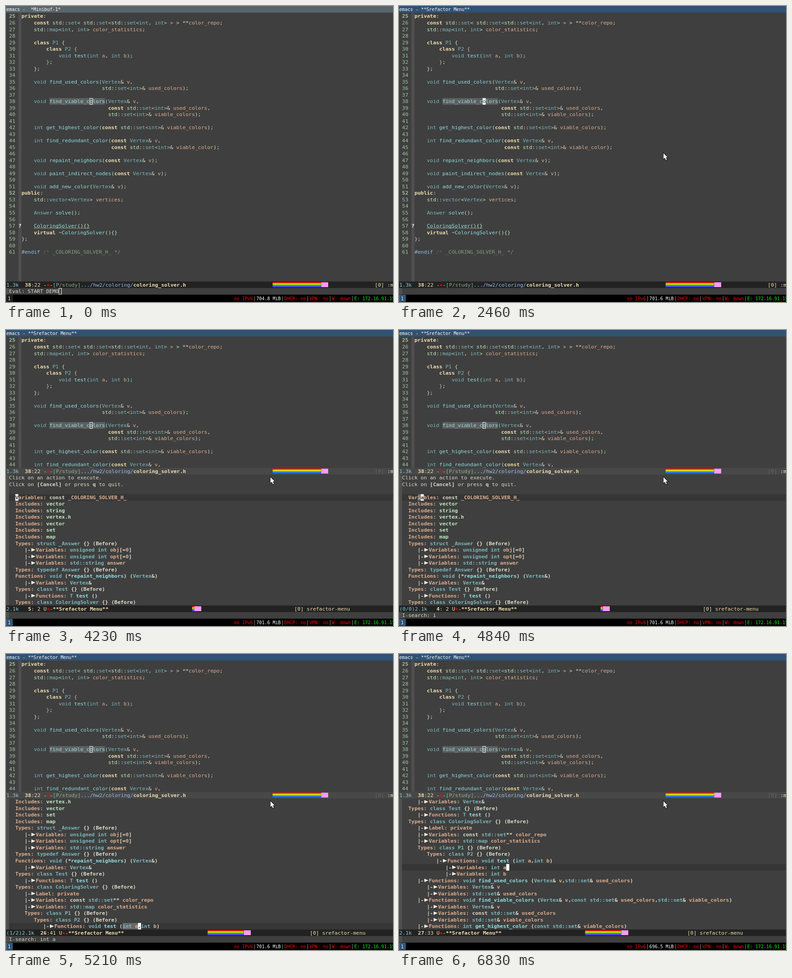
An HTML page with a canvas that plays this animation: 854 by 656 pixels, repeating every 8000 ms.

```html
<!DOCTYPE html>
<html lang="en">
<head>
<meta charset="utf-8">
<title>Refactor menu demo</title>
<style>
html, body { margin: 0; width: 100%; height: 100%; overflow: hidden; background: #3f3f3f; }
canvas { display: block; }
</style>
</head>
<body>
<canvas id="stage" width="854" height="656"></canvas>
<script>
const ctx = document.getElementById('stage').getContext('2d');

// The desktop is laid out on 1000 x 768 and shown at this scale.
const SCALE = 0.854, CHAR = 8, ROW = 17, TOP = 18, BOTTOM = 715, LOOP = 8000;
const ARROW_EXTRA = 5; // the arrow glyph is wider than a cell

const FG = '#dcdccc', BG = '#3f3f3f', CREAM = '#f0dfaf', TYPE = '#7cb8bb', FUNC = '#93e0e3',
  VAR = '#dfaf8f', MINT = '#bfebbf', BLUE = '#94bff3', SKY = '#8cd0d3', RED = '#ff0000',
  FRINGE = '#4f4f4f', CURSOR = '#ffffff';
const NESTING = [FG, FG, MINT, '#d0bf8f', FUNC];
const BANDS = ['#ff0000', '#ff9900', '#ffff00', '#33ee00', '#0099ff', '#6633ff'];

const codeText = `private:
    const std::set< std::set<std::set<int, int> > > **color_repo;
    std::map<int, int> color_statistics;

    class P1 {
        class P2 {
            void test(int a, int b);
        };
    };

    void find_used_colors(Vertex& v,
                          std::set<int>& used_colors);

    void find_viable_colors(Vertex& v,
                            const std::set<int>& used_colors,
                            std::set<int>& viable_colors);

    int get_highest_color(const std::set<int>& viable_colors);

    int find_redundant_color(const Vertex& v,
                             const std::set<int>& viable_color);

    void repaint_neighbors(const Vertex& v);

    void paint_indirect_nodes(const Vertex& v);

    void add_new_color(Vertex& v);
public:
    std::vector<Vertex> vertices;

    Answer solve();

    ColoringSolver(){}
    virtual ~ColoringSolver(){}
};

#endif /* _COLORING_SOLVER_H_ */`;

const smallText = `Functions: void find_viable_colors (Vertex& v,const std::set& used_colors,std::set& viable_colors)
Press 1-9 or click on an action to execute.
Click on [Cancel] or press q to quit.

  [1] Move (Current file)
  [2] Generate Function Pointer (Current file)
  [3] Generate Function Implementation (Other file)

[Cancel]`;

const bigText = `Click on an action to execute.
Click on [Cancel] or press q to quit.

  Variables: const _COLORING_SOLVER_H_
  Includes: vector
  Includes: string
  Includes: vertex.h
  Includes: vector
  Includes: set
  Includes: map
  Types: struct _Answer {} (Before)
     |-►Variables: unsigned int obj[=0]
     |-►Variables: unsigned int opt[=0]
     |-►Variables: std::string answer
  Types: typedef Answer {} (Before)
  Functions: void (*repaint_neighbors) (Vertex&)
     |-►Variables: Vertex&
  Types: class Test {} (Before)
     |-►Functions: T test ()
  Types: class ColoringSolver {} (Before)
     |-►Label: private
     |-►Variables: const std::set** color_repo
     |-►Variables: std::map color_statistics
     Types: class P1 {} (Before)
        Types: class P2 {} (Before)
           |-►Functions: void test (int a,int b)
              |-►Variables: int a
              |-►Variables: int b
     |-►Functions: void find_used_colors (Vertex& v,std::set& used_colors)
        |-►Variables: Vertex& v
        |-►Variables: std::set& used_colors
     |-►Functions: void find_viable_colors (Vertex& v,const std::set& used_colors,std::set& viable_colors)
        |-►Variables: Vertex& v
        |-►Variables: const std::set& used_colors
        |-►Variables: std::set& viable_colors
     |-►Functions: int get_highest_color (const std::set& viable_colors)`;

// Syntax rules: pattern, colour (or a function of the match), bold.
let depth = 0;
const bracket = s => NESTING['({<'.includes(s) ? ++depth : depth--];
const codeRules = [
  [/\s+/y, FG],
  [/\/\*/y, '#5f6a5f'],
  [/(?<=\/\* ).+/y, '#7f9f7f'],
  [/(const|class|private|public|virtual)\b/y, CREAM, true],
  [/std\b/y, MINT],
  [/(void|int|set|map|vector|Vertex|Answer|P\d)\b/y, TYPE],
  [/\w+(?=\()/y, FUNC],
  [/#\w+/y, BLUE],
  [/\w+/y, VAR],
  [/[(){}<>]/y, bracket],
  [/./y, FG]
];
const menuRules = [
  [/\s+/y, FG],
  [/(Variables|Includes|Types|Functions|Label):/y, VAR],
  [/(?<=Includes: ).+/y, MINT],
  [/(?<=: )const\b/y, FG],
  [/(struct|typedef|class) \w+/y, TYPE],
  [/(const|unsigned|int|void|Vertex|T|std::\w+)\b/y, TYPE],
  [/Before/y, FG],
  [/\w+(?=\)? \()/y, FUNC],
  [/\w+/y, VAR],
  [/./y, FG]
];
const plainRules = [
  [/\[Cancel\]|\bq\b|\[\d\].*/y, FG, true],
  [/[^[q]+|./y, FG]
];

function lexLine(text, rules, allBold) {
  const tokens = [];
  for (let col = 0; col < text.length;) {
    for (const [pattern, color, bold] of rules) {
      pattern.lastIndex = col;
      const match = pattern.exec(text);
      if (!match) continue;
      const s = match[0];
      tokens.push({ col, s, color: color.call ? color(s) : color, bold: bold || allBold });
      col += s.length;
      break;
    }
  }
  return { text, tokens };
}

const isPlain = s => /^(Press|Click|\[Cancel|  \[)/.test(s);
const lexMenu = (text, bold) => text.split('\n').map(s =>
  isPlain(s) ? lexLine(s, plainRules) : lexLine(s, menuRules, bold));

depth = 1; // inside the class body
const code = codeText.split('\n').map(s => lexLine(s, codeRules));
const small = { lines: lexMenu(smallText, false), y: 562, size: '316' };
const big = { lines: lexMenu(bigText, true), y: 375, size: '2.1k' };

// Each step changes part of the state and holds until the next.
const steps = [
  [0, { title: ' *Minibuf-1*', mem: '704.8', echo: 'Eval: START DEMO', mini: 'hollow',
        prefix: '', top: 1, hit: 0 }],
  [440, { focus: true }],
  [490, { mini: 'solid' }],
  [550, { mouse: 'arrow' }],
  [850, { mem: '701.6' }],
  [1230, { mini: '', echo: '', inCode: true }],
  [1280, { title: '~/workspace/study/discrete_optimization/hw2/coloring/coloring_solver.h', echo: 'Quit' }],
  [1860, { echo: '' }],
  [2410, { title: '**Srefactor Menu**' }],
  [2470, { inCode: false, menu: small, line: 6, col: 2, pos: ' 6: 2', nyan: 19 }],
  [2640, { mouse: 'beam' }],
  [2880, { line: 5 }],
  [2930, { pos: ' 5: 2', nyan: 17 }],
  [3000, { line: 6 }],
  [3050, { pos: ' 6: 2', nyan: 19 }],
  [3490, { menu: big, line: 5, pos: ' 5: 2', nyan: 0 }],
  [3540, { mouse: 'arrow' }],
  [4230, { line: 4 }],
  [4270, { pos: ' 4: 2' }],
  [4470, { echo: 'I-search: ' }],
  [4510, { prefix: '(0/0)' }],
  [4840, { echo: 'I-search: i', col: 6, hit: 1 }],
  [4880, { prefix: '(1/77)', pos: ' 4: 6' }],
  [4930, { echo: 'I-search: in', line: 5, col: 4, hit: 2 }],
  [4970, { prefix: '(1/18)', pos: ' 5: 4' }],
  [5010, { echo: 'I-search: int', line: 12, col: 31, hit: 3 }],
  [5050, { prefix: '(1/9)', pos: '12:31', nyan: 4 }],
  [5090, { echo: 'I-search: int ', col: 32, hit: 4 }],
  [5130, { prefix: '(1/8)', pos: '12:32' }],
  [5170, { echo: 'I-search: int a', line: 26, col: 41, hit: 5, top: 7 }],
  [5210, { prefix: '(1/2)', pos: '26:41', nyan: 11 }],
  [5770, { line: 27, col: 33, top: 8 }],
  [5810, { prefix: '(2/2)', pos: '27:33' }],
  [5850, { prefix: '', hit: 0, echo: 'Mark saved where search started', mem: '696.5' }],
  [6790, { top: 17 }],
  [6830, { echo: '' }]
];

function rect(x, y, w, h, color) {
  ctx.fillStyle = color;
  ctx.fillRect(x, y, w, h);
}

function outline(x, y, w, h, color) {
  ctx.strokeStyle = color;
  ctx.lineWidth = 1.2;
  ctx.strokeRect(x + 0.6, y + 0.6, w - 1.2, h - 1.2);
}

function write(s, x, baseline, color, bold, size = 13.29) {
  ctx.font = `${bold ? 'bold ' : ''}${size}px "DejaVu Sans Mono", monospace`;
  ctx.fillStyle = color;
  ctx.fillText(s, x, baseline);
}
const cell = (s, x, y, color, bold) => write(s, x, y + 13, color, bold);
const small7 = (s, x, baseline, color) => write(s, x, baseline, color, false, 11.63);

function path(points, fill, stroke) {
  ctx.beginPath();
  points.forEach(([x, y]) => ctx.lineTo(x, y));
  ctx.closePath();
  if (stroke) { ctx.strokeStyle = stroke; ctx.lineWidth = 2; ctx.stroke(); }
  ctx.fillStyle = fill;
  ctx.fill();
}

function columnX(text, col, left) {
  const arrow = text.indexOf('►');
  return left + col * CHAR + (arrow >= 0 && col > arrow ? ARROW_EXTRA : 0);
}

function drawLine({ text, tokens }, left, y) {
  for (const { col, s, color, bold } of tokens) {
    const x = columnX(text, col, left);
    if (s === '►') path([[x + 1.5, y + 4], [x + 12, y + 8.5], [x + 1.5, y + 13]], '#f4f4ea');
    else cell(s, x, y, color, bold);
  }
}

function solidCursor(x, y, char, bold) {
  rect(x, y, CHAR, ROW, CURSOR);
  if (char) cell(char, x, y, BG, bold);
}

function drawCode(solid, bottom) {
  rect(32, TOP, CHAR, bottom - TOP, FRINGE);
  const cursorY = TOP + 13 * ROW, cursorX = 40 + 22 * CHAR;
  rect(40 + 9 * CHAR, cursorY, 18 * CHAR, ROW, '#5f5f5f');
  code.forEach((line, i) => {
    const y = TOP + i * ROW;
    if (y >= bottom) return;
    cell(String(25 + i), 8, y, '#9fc59f', /^p/.test(line.text));
    drawLine(line, 40, y);
    if (line.text.startsWith('    ColoringSolver')) {
      cell('?', 32, y, '#ffffff', true);
      ctx.beginPath();
      for (let x = 72; x <= 216; x += 2) ctx.lineTo(x, y + (x % 4 ? 15.5 : 13.5));
      ctx.strokeStyle = '#b5cfa0';
      ctx.lineWidth = 1;
      ctx.stroke();
    }
  });
  if (solid) solidCursor(cursorX, cursorY, 'o');
  else outline(cursorX, cursorY, CHAR, ROW, CURSOR);
}

function drawMenu({ menu, line, col, top, hit }) {
  const rows = (BOTTOM - menu.y) / ROW;
  const current = menu.lines[line - 1];
  const y = menu.y + (line - top) * ROW, x = columnX(current.text, col, CHAR);
  rect(0, menu.y, CHAR, BOTTOM - menu.y, FRINGE);
  rect(CHAR, y, 1000, ROW, '#363636');
  rect(x - hit * CHAR, y, hit * CHAR, ROW, '#686868');
  if (current.text[col] === '[') rect(x + 2 * CHAR, y, CHAR, ROW, '#5f5f5f');
  menu.lines.slice(top - 1, top - 1 + rows).forEach((l, i) => drawLine(l, CHAR, menu.y + i * ROW));
  solidCursor(x, y, current.text[col], true);
}

function drawModeline(y, active, parts, nyan, mode) {
  rect(0, y, 1000, ROW, active ? '#222222' : '#484848');
  let x = 1, nameX = 1;
  for (const [s, color = CREAM, bold] of parts) {
    nameX = x;
    cell(s, x, y, color, bold);
    x += s.length * CHAR;
  }
  const start = nameX + 45 * CHAR;
  BANDS.forEach((c, i) => rect(start, y + 1.5 + i * 2.2, nyan * CHAR + 5, 2.2, c));
  rect(start + 5.5 + nyan * CHAR, y + 2, 18, 12.5, '#ff9bff');
  cell('[0]', start + 33 * CHAR, y, active ? CREAM : '#5f6a5f');
  cell(mode, start + 37 * CHAR, y, CREAM);
}

function drawStatus(focus, mem) {
  rect(0, 749, 1000, 19, '#000000');
  rect(0, 750, 17, 17, focus ? '#2c5376' : '#1c1c1c');
  outline(0, 750, 17, 17, focus ? '#4c7899' : '#333333');
  small7('1', 5, 763, '#ffffff');
  const items = [['no IPv6', RED], [mem + ' MiB', '#ffffff'], ['DHCP: no', RED],
    ['VPN: no', RED], ['W: down', RED], ['E: 172.16.91.15', '#00ff00']];
  let x = 589;
  items.forEach(([s, color], i) => {
    if (i) rect(x - 5, 753, 1, 13, '#aaaaaa');
    small7(s, x, 764, color);
    x += s.length * 7 + 9;
  });
}

function drawMouse(kind) {
  if (kind === 'arrow') {
    const shape = [[0, 0], [0, 15], [3.5, 12], [6, 18], [8.5, 17], [6, 11], [10.5, 11]];
    path(shape.map(([x, y]) => [x + 683.5, y + 382]), '#ffffff', '#111111');
  } else if (kind === 'beam') {
    rect(681, 377, 7, 3, '#111111');
    rect(681, 388, 7, 3, '#111111');
    rect(683, 378, 3, 12, '#111111');
    rect(682, 378, 5, 1, '#ffffff');
    rect(682, 389, 5, 1, '#ffffff');
    rect(684, 378, 1, 12, '#ffffff');
  }
}

function draw(t) {
  const s = Object.assign({}, ...steps.filter(([at]) => at <= t).map(([, change]) => change));
  ctx.setTransform(SCALE, 0, 0, SCALE, 0, 0);
  rect(0, 0, 1000, 769, BG);

  const codeEnd = s.menu ? s.menu.y - ROW : BOTTOM;
  drawCode(s.inCode, codeEnd);
  drawModeline(codeEnd, !s.menu, [
    ['1.3k', SKY], ['  '], ['38', CREAM, true], [':22 -'], ['×', RED, true], ['-'],
    ['[P/study]', '#8fb28f'], ['.../hw2/coloring/', BLUE], ['coloring_solver.h', CREAM, true]
  ], 15, ':master C++/lw');

  if (s.menu) {
    const [row, col] = s.pos.split(':');
    drawMenu(s);
    drawModeline(BOTTOM, true, [
      [s.prefix, SKY], [s.menu.size, SKY], ['  '], [row, CREAM, true], [`:${col} U`],
      ['×', RED, true], ['-'], ['**Srefactor Menu**', CREAM, true]
    ], s.nyan, 'srefactor-menu');
  }

  const echoY = BOTTOM + ROW, echoEnd = CHAR + s.echo.length * CHAR;
  rect(0, echoY, CHAR, ROW, FRINGE);
  cell(s.echo, CHAR, echoY, FG);
  if (s.mini === 'hollow') outline(echoEnd, echoY, CHAR, ROW, CURSOR);
  if (s.mini === 'solid') solidCursor(echoEnd, echoY);

  rect(0, 0, 1000, TOP - 1, s.focus ? '#305274' : '#5a666c');
  small7('emacs - ' + s.title, 1, 13, '#ffffff');
  drawStatus(s.focus, s.mem);
  drawMouse(s.mouse);
}

function tick() {
  draw(performance.now() % LOOP);
  requestAnimationFrame(tick);
}
tick();
</script>
</body>
</html>
```
